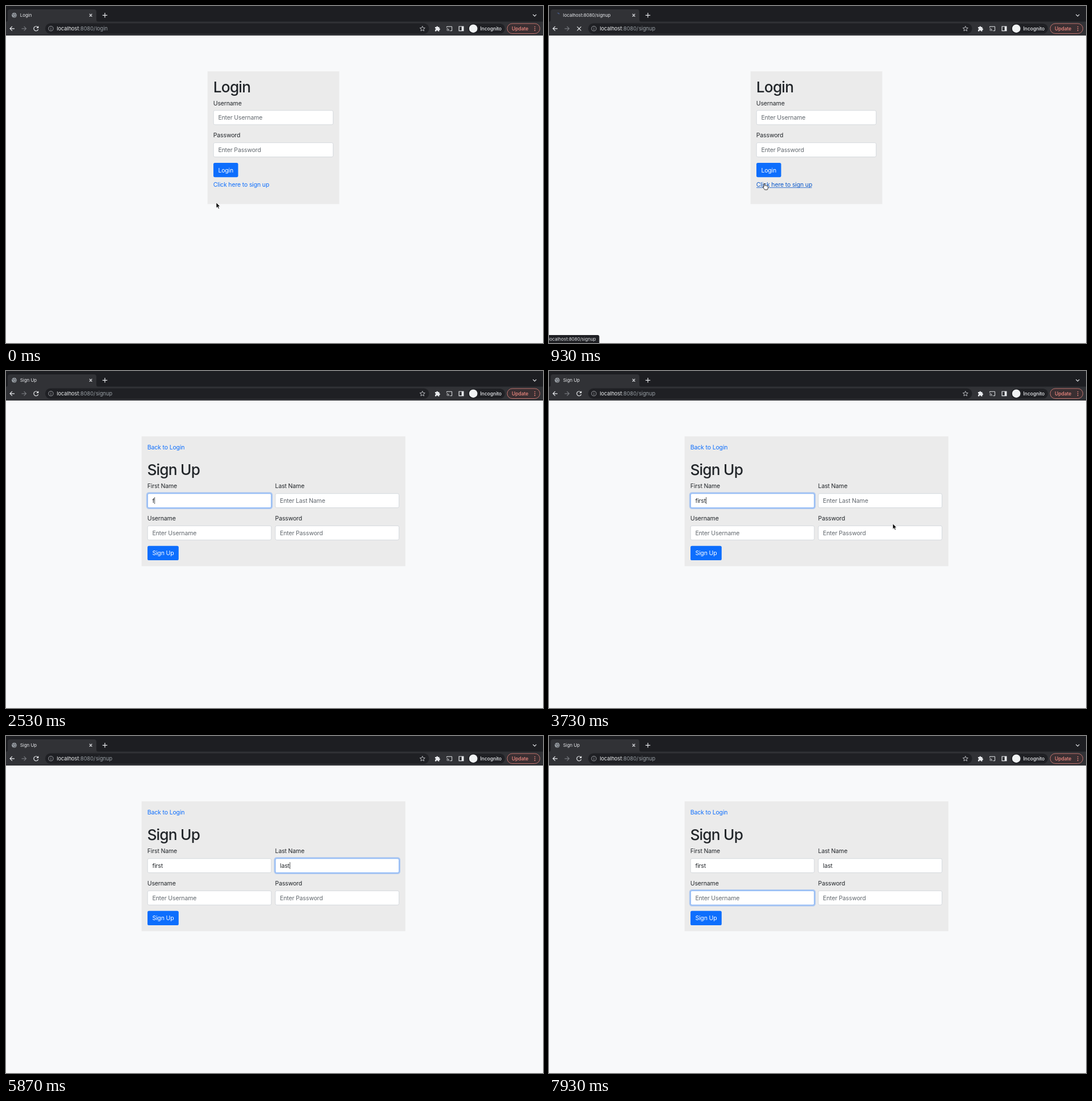
Recreate the animation shown at these times as an HTML page. Size 945x593 px, loop 8000 ms.

```html
<!DOCTYPE html>
<html lang="en">
<head>
<meta charset="utf-8">
<title>Sign up walkthrough</title>
<style>
html, body { margin: 0; height: 100%; overflow: hidden; background: #f8f9fa; }
svg { display: block; width: 100vw; height: 100vh; }
text { font: 10.5px Inter, sans-serif; font-optical-sizing: none; letter-spacing: -.15px; fill: #212529; }
.h1 { font-size: 26.25px; font-weight: 500; letter-spacing: -.8px; }
.hint { fill: #62686e; }
.link { fill: #0d6efd; }
.btn { fill: #0d6efd; }
.btn + text { fill: #fff; }
.ui { font-size: 7.9px; letter-spacing: 0; fill: #e8eaed; }
.url { font-size: 9.2px; letter-spacing: 0; fill: #9aa0a6; }
.pill { font-size: 8.5px; font-weight: 500; letter-spacing: -.04px; fill: #e8eaed; }
.panel { fill: #ebebeb; }
.field { fill: #fff; stroke: #c9ced4; stroke-width: .7; }
.cover { fill: #fff; }
.caret { fill: #212529; }
.line { fill: none; stroke: #e8eaed; stroke-width: 1.2; }
.glow { fill: none; stroke: #0d6efd; stroke-opacity: .28; stroke-width: 2.4; }
.edge { fill: none; stroke: #86b7fe; stroke-width: 1; }

/* One shared 8 s clock: .step switches hard, .ease interpolates. */
.step { animation: 8s step-end infinite; }
.ease { animation: 8s linear infinite; }
.spin { animation: spin .8s linear infinite; transform-origin: 14.5px 16px; }
@keyframes spin { to { transform: rotate(360deg); } }

@keyframes login { 0% { opacity: 1; } 13.3% { opacity: 0; } }
@keyframes signup { 0% { opacity: 0; } 13.3% { opacity: 1; } }
@keyframes hover { 0% { opacity: 0; } .87% { opacity: 1; } }
@keyframes rest { 0% { opacity: 1; } .87% { opacity: 0; } }
@keyframes before { 0% { opacity: 1; } 8.3% { opacity: 0; } }
@keyframes after { 0% { opacity: 0; } 8.3% { opacity: 1; } }
@keyframes loading { 0% { opacity: 0; } 8.3% { opacity: 1; } 14.1% { opacity: 0; } }
@keyframes idle { 0% { opacity: 1; } 8.3% { opacity: 0; } 14.1% { opacity: 1; } }
@keyframes loaded { 0% { opacity: 0; } 14.1% { opacity: 1; } }

@keyframes ring1 { 0%, 21.4% { opacity: 0; } 23.3%, 57.3% { opacity: 1; } 59.1%, 100% { opacity: 0; } }
@keyframes ring2 { 0%, 57% { opacity: 0; } 58.4%, 89.6% { opacity: 1; } 91.5%, 100% { opacity: 0; } }
@keyframes ring3 { 0%, 89.6% { opacity: 0; } 91.5%, 100% { opacity: 1; } }
@keyframes blink1 {
  0% { opacity: 0; } 21.6% { opacity: 1; } 27.5% { opacity: 0; } 31.6% { opacity: 1; }
  47.1% { opacity: 0; } 53.3% { opacity: 1; } 57.4% { opacity: 0; }
}
@keyframes blink2 { 0% { opacity: 0; } 57.4% { opacity: 1; } 79.6% { opacity: 0; } 85.8% { opacity: 1; } 90% { opacity: 0; } }
@keyframes blink3 { 0% { opacity: 0; } 90% { opacity: 1; } 96.6% { opacity: 0; } }
@keyframes hint1 { 0% { opacity: 1; } 31.6% { opacity: 0; } }
@keyframes hint2 { 0% { opacity: 1; } 63.3% { opacity: 0; } }
@keyframes type1 {
  0% { transform: none; } 31.6% { transform: translateX(3.7px); } 33.3% { transform: translateX(6.1px); }
  35.8% { transform: translateX(9.9px); } 39.1% { transform: translateX(15.2px); } 40.8% { transform: translateX(18.9px); }
}
@keyframes type2 {
  0% { transform: none; } 63.3% { transform: translateX(2.4px); } 69.1% { transform: translateX(8.1px); }
  71.6% { transform: translateX(13.5px); } 73.3% { transform: translateX(17.2px); }
}

@keyframes path {
  0% { transform: translate(370px, 346px); animation-timing-function: step-end; }
  .87%, 3.3% { transform: translate(364px, 322px); }
  5.8%, 13.9% { transform: translate(379px, 312px); animation-timing-function: ease-in-out; }
  17.4%, 44% { transform: translate(403.5px, 236.3px); }
  46.6% { transform: translate(605px, 269px); }
  50% { transform: translate(602px, 249px); animation-timing-function: ease-out; }
  54.1%, 76.5% { transform: translate(596px, 232px); animation-timing-function: ease-in-out; }
  85.8%, 100% { transform: translate(409.5px, 297.5px); }
}
@keyframes arrow {
  0% { opacity: 1; } .87% { opacity: 0; } 13.3% { opacity: 1; } 16.7% { opacity: 0; }
  45% { opacity: 1; } 51.8% { opacity: 0; } 78.3% { opacity: 1; } 82.8% { opacity: 0; }
}
@keyframes hand { 0% { opacity: 0; } .87% { opacity: 1; } 13.3% { opacity: 0; } }
@keyframes beam {
  0% { opacity: 0; } 16.7% { opacity: 1; } 31.6% { opacity: 0; } 44.1% { opacity: 1; } 45% { opacity: 0; }
  51.8% { opacity: 1; } 63.3% { opacity: 0; } 76.6% { opacity: 1; } 78.3% { opacity: 0; }
  82.8% { opacity: 1; } 99.1% { opacity: 0; }
}
</style>
</head>
<body>
<svg viewBox="0 0 945 593">
  <rect width="945" height="593" fill="#f8f9fa"/>

  <!-- Browser bar -->
  <rect width="945" height="28" fill="#1d1e22"/>
  <rect y="27.5" width="945" height="24.5" fill="#313236"/>
  <path d="M0 28q3 0 3-4V10q0-4 4-4H155q4 0 4 4V24q0 4 4 4Z" fill="#313236"/>
  <g class="step" style="animation-name:idle">
    <circle cx="14.5" cy="16.2" r="4.4" fill="#9aa0a6"/>
    <path d="M11 14.5l2.5 1.5 1 2.5-.8 1.6M14.5 12.5l-.4 1.8 2 .8 2.2-.6M18.5 17l-2 .3-.5 2" fill="none" stroke="#45474c" stroke-width=".9"/>
  </g>
  <g class="step" style="animation-name:loading">
    <path class="spin" d="M11.4 13.7A4 4 0 0 1 14.8 12" fill="none" stroke="#5b7fd0" stroke-width=".9"/>
  </g>
  <text class="ui step" x="24.8" y="19" style="animation-name:before">Login</text>
  <text class="ui step" x="24.8" y="19" style="animation-name:loading">localhost:8080/signup</text>
  <text class="ui step" x="24.8" y="19" style="animation-name:loaded">Sign Up</text>
  <path class="line" d="M146.8 13.9l4.6 4.6m0-4.6l-4.6 4.6M169.8 16.3h8.4m-4.2-4.2v8.4M927.3 14.8l3 3 3-3"/>

  <rect x="69" y="30.5" width="675.5" height="18.5" rx="9.2" fill="#1f2024"/>
  <path class="line" d="M15 39.8H7m3.9-3.9L7 39.8l3.9 3.9"/>
  <path class="line" d="M27.5 39.8h8m-3.9-3.9l3.9 3.9-3.9 3.9" style="stroke:#75777c"/>
  <g class="step" style="animation-name:idle">
    <path class="line" d="M56 37.2A4 4 0 1 0 56.7 41"/>
    <path d="M57.3 35v4h-4z" fill="#e8eaed"/>
  </g>
  <path class="line step" d="M49.5 36.3l7 7m0-7l-7 7" style="animation-name:loading"/>
  <g fill="none" stroke="#b4b7bb" stroke-width=".8">
    <circle cx="79" cy="39.7" r="4.1"/>
    <path d="M79 39.2v2.8M79 37.2v1"/>
  </g>
  <text class="url" x="89.2" y="43"><tspan fill="#f1f3f4">localhost</tspan>:8080/<tspan class="step" style="animation-name:before"></tspan></text>
  <g>
    <text class="url step" x="157.9" y="43" style="animation-name:before">login</text>
    <text class="url step" x="157.9" y="43" style="animation-name:after">signup</text>
  </g>
  <path d="M732.8 35.4l1.25 3 3.25.25-2.5 2.1.8 3.15-2.8-1.7-2.8 1.7.8-3.15-2.5-2.1 3.25-.25z" fill="none" stroke="#c4c7cb" stroke-width=".9"/>
  <path d="M755 37h2.3a1.5 1.5 0 0 1 3 0h2.2v2.3a1.5 1.5 0 0 1 0 3v2.2h-2.4a1.4 1.4 0 0 0-2.8 0H755v-2.5a1.4 1.4 0 0 0 0-2.8z" fill="#e8eaed"/>
  <path class="line" d="M775.7 38v-1.8h9v7.4h-3.2M775.5 39.8a4 4 0 0 1 4 4M775.5 42a2 2 0 0 1 1.8 1.8" style="stroke-width:1"/>
  <path class="line" d="M797.2 36h7.8v7.6h-7.8z"/>
  <rect x="801.8" y="36" width="3.2" height="7.6" fill="#e8eaed"/>
  <rect x="813" y="31" width="65" height="17.5" rx="8.7" fill="#1f2024"/>
  <circle cx="822.3" cy="39.7" r="7.3" fill="#f1f3f4"/>
  <text class="pill" x="834.6" y="42.9">Incognito</text>
  <rect x="882" y="30.9" width="57.5" height="17.6" rx="8.8" fill="#3a2f32" stroke="#e5867e" stroke-width=".8"/>
  <text class="pill" x="890" y="42.9" style="fill:#f28b82">Update</text>
  <g fill="#f28b82"><circle cx="930.6" cy="36.6" r=".9"/><circle cx="930.6" cy="39.8" r=".9"/><circle cx="930.6" cy="43" r=".9"/></g>

  <!-- Login page -->
  <g class="step" style="animation-name:login">
    <rect class="panel" x="354.7" y="115" width="231.8" height="233.5"/>
    <text class="h1" x="364.8" y="151.8">Login</text>
    <text x="364.8" y="174.5">Username</text>
    <rect class="field" x="365.2" y="183.8" width="210.5" height="25" rx="2.5"/>
    <text class="hint" x="373.4" y="200.3">Enter Username</text>
    <text x="364.8" y="231.2">Password</text>
    <rect class="field" x="365.2" y="240.6" width="210.5" height="25" rx="2.5"/>
    <text class="hint" x="373.4" y="257">Enter Password</text>
    <rect class="btn" x="365" y="276" width="43.5" height="25.2" rx="2.6"/>
    <text x="373.4" y="292.6">Login</text>
    <text class="link step" x="364.8" y="318.2" style="animation-name:rest">Click here to sign up</text>
    <g class="step" style="animation-name:hover">
      <text x="364.8" y="318.2" style="fill:#0a58ca">Click here to sign up</text>
      <rect x="365" y="319.3" width="97.5" height=".8" fill="#0a58ca"/>
    </g>
  </g>

  <!-- Sign up page -->
  <g class="step" style="animation-name:signup">
    <rect class="panel" x="238.6" y="115" width="464.2" height="228.4"/>
    <text class="link" x="248.8" y="137.6">Back to Login</text>
    <text class="h1" x="248.4" y="183.3">Sign Up</text>
    <text x="248.8" y="206.3">First Name</text>
    <text x="473.6" y="206.3">Last Name</text>
    <text x="248.8" y="263">Username</text>
    <text x="473.6" y="263">Password</text>
    <rect class="field" x="249.2" y="215.7" width="217.6" height="24.9" rx="2.5"/>
    <rect class="field" x="474" y="215.7" width="217.6" height="24.9" rx="2.5"/>
    <rect class="field" x="249.2" y="272.4" width="217.6" height="24.9" rx="2.5"/>
    <rect class="field" x="474" y="272.4" width="217.6" height="24.9" rx="2.5"/>

    <!-- A white cover slides right to reveal the typed letters -->
    <text x="257.4" y="231.9">first</text>
    <g class="step" style="animation-name:type1">
      <rect class="cover" x="257.4" y="218" width="40" height="20"/>
      <rect class="caret step" x="257.4" y="222" width=".8" height="12" style="animation-name:blink1"/>
    </g>
    <text x="482.1" y="231.9">last</text>
    <g class="step" style="animation-name:type2">
      <rect class="cover" x="482.1" y="218" width="40" height="20"/>
      <rect class="caret step" x="482.1" y="222" width=".8" height="12" style="animation-name:blink2"/>
    </g>
    <rect class="caret step" x="257.2" y="279" width=".8" height="12" style="animation-name:blink3"/>

    <text class="hint step" x="257.4" y="231.9" style="animation-name:hint1">Enter First Name</text>
    <text class="hint step" x="482.1" y="231.9" style="animation-name:hint2">Enter Last Name</text>
    <text class="hint" x="257.4" y="288.6">Enter Username</text>
    <text class="hint" x="482.1" y="288.6">Enter Password</text>

    <g class="ease" style="animation-name:ring1">
      <rect class="glow" x="248" y="214.4" width="220" height="27.5" rx="3.6"/>
      <rect class="edge" x="249.2" y="215.7" width="217.6" height="24.9" rx="2.5"/>
    </g>
    <g class="ease" style="animation-name:ring2">
      <rect class="glow" x="472.8" y="214.4" width="220" height="27.5" rx="3.6"/>
      <rect class="edge" x="474" y="215.7" width="217.6" height="24.9" rx="2.5"/>
    </g>
    <g class="ease" style="animation-name:ring3">
      <rect class="glow" x="248" y="271.1" width="220" height="27.5" rx="3.6"/>
      <rect class="edge" x="249.2" y="272.4" width="217.6" height="24.9" rx="2.5"/>
    </g>
    <rect class="btn" x="249" y="307.8" width="54.8" height="25.2" rx="2.6"/>
    <text x="257.4" y="324.3">Sign Up</text>
  </g>

  <!-- Link preview -->
  <g class="step" style="animation-name:loading">
    <path d="M0 579H85.5q3 0 3 3V593H0z" fill="#1f2024"/>
    <text class="ui" x="-1" y="589">localhost:8080/signup</text>
  </g>

  <!-- Pointer, origin at its hot spot -->
  <g class="ease" style="animation-name:path">
    <path class="step" style="animation-name:arrow" d="M0 0V9.4L2.2 7.4 3.8 11 5.4 10.3 3.8 6.8H6.8Z" fill="#000" stroke="#fff" stroke-width=".7"/>
    <path class="step" style="animation-name:hand" d="M-.9 .8Q0-.6 .9 .8V4Q2.2 3.2 2.8 4.3 4.2 3.7 4.7 4.9 6.4 4.6 6.4 6.2V8Q6.2 9.6 5.2 11.3H.6Q-.6 9.4-2.6 6.8-2.9 5.4-.9 6.5Z" fill="#fff" stroke="#000" stroke-width=".8"/>
    <path class="step" style="animation-name:beam" d="M-2.3-5Q0-5 0-4 0-5 2.3-5M0-4.2V4.2M-2.3 5Q0 5 0 4 0 5 2.3 5M-1.2 1.8H1.2" fill="none" stroke="#111" stroke-width=".9"/>
  </g>
</svg>
</body>
</html>
```
